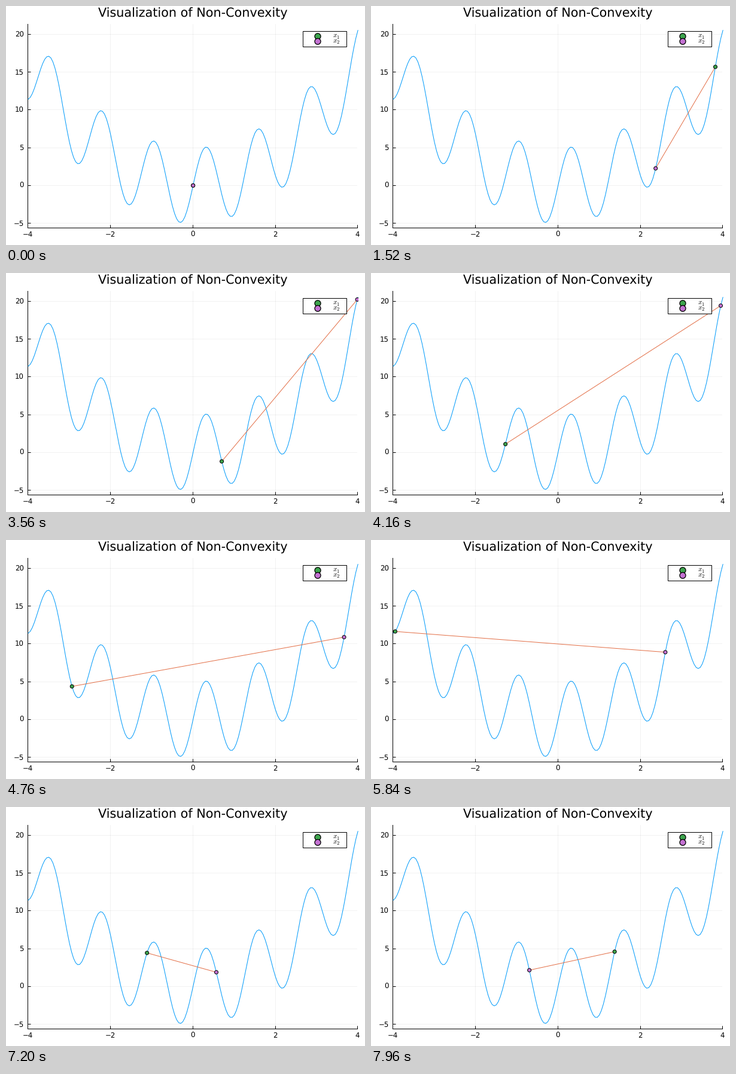
A matplotlib script that plays this animation: 600 px wide and 400 px high, repeating every 8 s.

```python
import numpy as np
import matplotlib.pyplot as plt
from matplotlib.animation import FuncAnimation

W, H, DPI = 600, 400, 100
PX = 72 / DPI  # points per pixel
LEFT, RIGHT, TOP, BOTTOM = 36.4, 587.4, 30.35, 371.15
BLUE, ORANGE, GREEN, PURPLE = "#009afa", "#e36f47", "#3da44d", "#c371d2"

plt.rcParams["font.family"] = "DejaVu Sans"
plt.rcParams["mathtext.fontset"] = "cm"
plt.rcParams["text.hinting"] = "none"


def f(x):
    return x**2 + 5 * np.sin(5 * x)


def to_px(x):
    """Pixel position of the curve point at x."""
    return 312.65 + 68.88 * x, 300.4 - 12.63 * f(x)


def ends(n):
    return 4 * np.sin(n / np.array([30, 60]))


fig = plt.figure(figsize=(W / DPI, H / DPI), dpi=DPI, facecolor="white")

# Axis lines, ticks and grid
ax = fig.add_axes([LEFT / W, 1 - BOTTOM / H, (RIGHT - LEFT) / W, (BOTTOM - TOP) / H])
x = np.linspace(-4, 4, 161)
y = f(x)
margin = 0.03 * np.ptp(y)
ax.set_xlim(-4, 4)
ax.set_ylim(y.min() - margin, y.max() + margin)
ax.set_xticks(range(-4, 5, 2))
ax.set_yticks(range(-5, 21, 5))
ax.set_axisbelow(True)
ax.grid(color="black", alpha=0.1, lw=0.5 * PX)
ax.tick_params(direction="in", length=5 * PX, width=PX, labelsize=11.8 * PX)
ax.tick_params(axis="x", pad=5.9 * PX)
ax.tick_params(axis="y", pad=6.5 * PX)
for side in ("top", "right"):
    ax.spines[side].set_visible(False)
for side in ("left", "bottom"):
    ax.spines[side].set_linewidth(PX)

# Everything else sits on a layer measured in pixels from the top left.
top = fig.add_axes([0, 0, 1, 1], zorder=2)
top.set_xlim(0, W)
top.set_ylim(H, 0)
top.axis("off")


def dot(color, radius, edge, center=(0, 0), z=3):
    return top.add_patch(plt.Circle(center, radius, fc=color, ec="black",
                                    lw=edge * PX, zorder=z))


curve, = top.plot(*to_px(x), color=BLUE, lw=PX)
chord, = top.plot([], [], color=ORANGE, lw=PX)
dots = [dot(c, 3, 1) for c in (GREEN, PURPLE)]
window = plt.Rectangle((36, TOP), 552.5, BOTTOM - TOP, transform=top.transData)
for part in (curve, chord, *dots):
    part.set_clip_path(window)

top.text(312.5, 19, "Visualization of Non-Convexity", fontsize=20.8 * PX,
         ha="center", va="baseline")
top.add_patch(plt.Rectangle((496.5, 42.5), 73, 26, fc="white", ec="black",
                            lw=PX, snap=False, zorder=4))
for color, sub, row in ((GREEN, "1", 50.8), (PURPLE, "2", 59.3)):
    dot(color, 5, 1.3, (521, row), z=5)
    top.text(545.5, row + 1.5, "$x$", fontsize=11.5 * PX, zorder=5)
    top.text(552.3, row + 4, f"${sub}$", fontsize=8.5 * PX, zorder=5)


def draw(n):
    xs, ys = to_px(ends(n))
    chord.set_data(xs, ys)
    for d, center in zip(dots, zip(xs, ys)):
        d.set_center(center)
    return [chord, *dots]


anim = FuncAnimation(fig, draw, frames=200, interval=40, repeat=True,
                     repeat_delay=0, blit=False)
plt.show()
```
